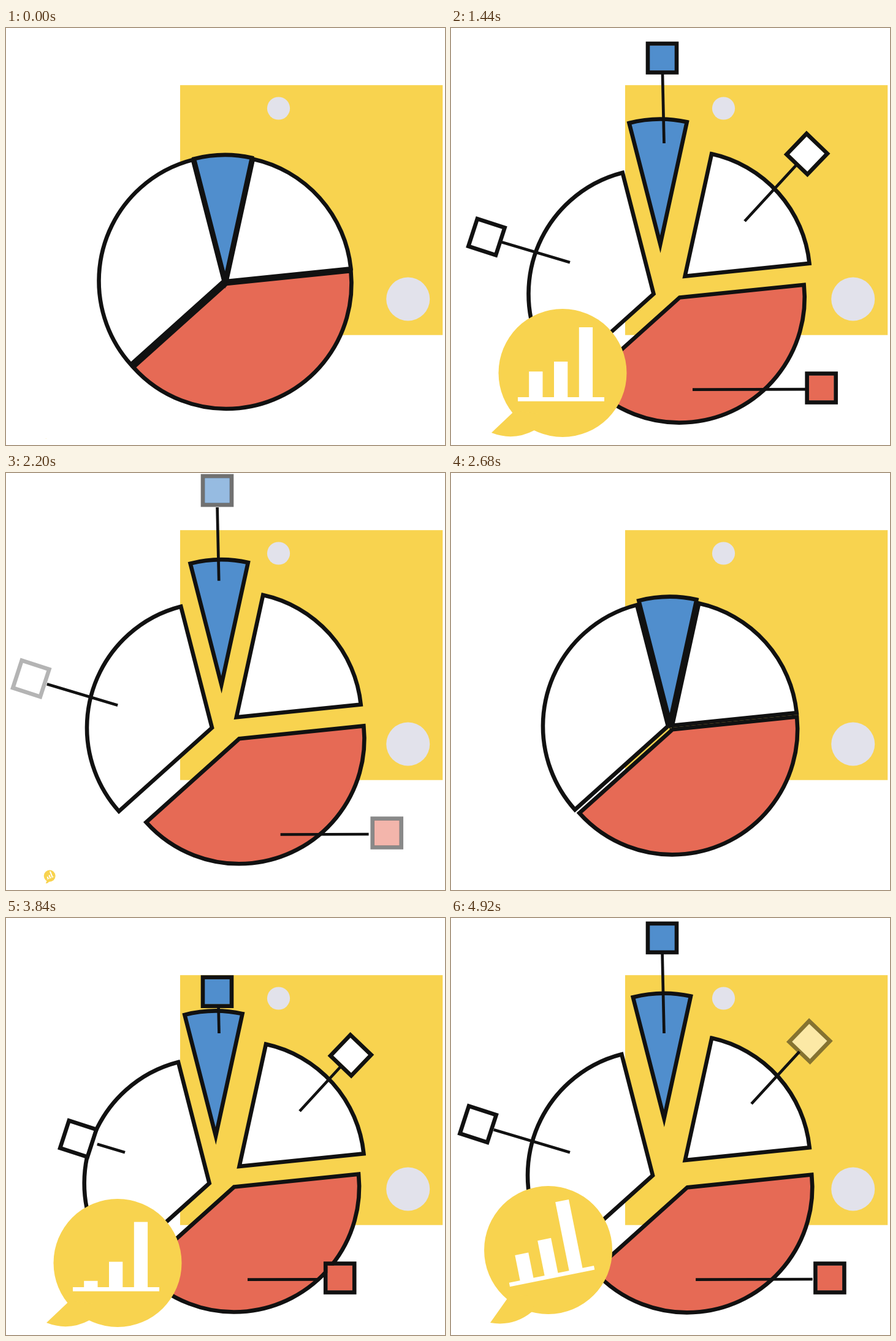
An HTML page with a canvas for the animation above (4.96 s loop, 716x680 px).

```html
<!DOCTYPE html>
<html lang="en">
<head>
<meta charset="utf-8">
<title>Pie chart</title>
<style>
  html, body { margin: 0; width: 100%; height: 100%; overflow: hidden; background: #fff; }
  canvas { display: block; }
</style>
</head>
<body>
<canvas id="stage" width="716" height="680"></canvas>
<script>
const ctx = document.getElementById('stage').getContext('2d');
const LOOP = 4960, CYCLE = 3000, RAD = Math.PI / 180;
const YELLOW = '#f8d34f', BLUE = '#508ecd', RED = '#e66a55', GREY = '#e2e2eb', INK = '#111', WHITE = '#fff';
const RADIUS = 204, OUTLINE = 6.6;

const mix = (a, b, u) => a.map((v, i) => v + (b[i] - v) * u);
const ramp = (t, start, length) => Math.min(1, Math.max(0, (t - start) / length));
const smooth = (t, start, length) => {
  const u = ramp(t, start, length);
  return u * u * (3 - 2 * u);
};
const easeOut = u => 1 - (1 - u) ** 3;
// Slows down exponentially towards 1
const settle = (t, start, pace) => t > start ? 1 - Math.exp((start - t) / pace) : 0;
// Quick S-curve with a long tail, halfway after `half` ms
const swing = (t, start, half, power) => t > start ? 1 / (1 + (half / (t - start)) ** power) : 0;

// Each slice moves from rest by `open`, drifts on to `far`, then returns
const slices = [
  { color: WHITE, from: 138.1, to: 255.6, rest: [355.5, 412.5], open: [-25.5, 21.5], far: [-27, 4] },
  { color: WHITE, from: -77.7, to: -5.85, rest: [359.5, 413], open: [22.5, -8.5], far: [22.5, -20.3] },
  { color: RED, from: -5.85, to: 138.1, rest: [359.5, 417], open: [13.5, 23], far: [29, 22.5] },
  { color: BLUE, from: -104.4, to: -77.7, rest: [357.5, 411], open: [-16.5, -59.5], far: [-8.5, -91] }
];

// A square travels from a to b while a line grows from tail to head
const labels = [
  { color: BLUE, angle: 0, start: 400, a: [344.5, 283], b: [344.5, 24], hide: 2120,
    tail: [347.5, 188], head: [344.5, 53], lineStart: 670, pace: 400, trim: [2020, 600] },
  { color: WHITE, angle: 18, start: 400, a: [254.7, 404.2], b: [37, 334], hide: 2064,
    tail: [194, 382.3], head: [64, 343.5], lineStart: 670, pace: 400, trim: [2020, 600] },
  { color: RED, angle: 0, start: 400, a: [408.7, 587], b: [625, 587], hide: 2100,
    tail: [394, 589.7], head: [593, 589], lineStart: 550, pace: 335, trim: [1796, 780] },
  { color: WHITE, angle: 43.8, start: 60, a: [444.7, 342.8], b: [587, 199], hide: 1820,
    tail: [479, 315], head: [570, 216], lineStart: 250, pace: 420, trim: [1772, 428] }
];

function disc(x, y, r, color) {
  ctx.fillStyle = color;
  ctx.beginPath();
  ctx.arc(x, y, r, 0, 7);
  ctx.fill();
}

function drawSlice(s, t) {
  const out = swing(t, 0, 283, 2.43) * (1 - swing(t, 2010, 265, 3));
  const [dx, dy] = mix(s.open, s.far, smooth(t, 1460, 640));
  const x = s.rest[0] + dx * out, y = s.rest[1] + dy * out;
  ctx.beginPath();
  ctx.moveTo(x, y);
  ctx.arc(x, y, RADIUS, s.from * RAD, s.to * RAD);
  ctx.closePath();
  ctx.fillStyle = s.color;
  ctx.fill();
  ctx.lineWidth = OUTLINE;
  ctx.stroke();
}

function drawLabel(l, t) {
  ctx.save();
  ctx.globalAlpha = ramp(t, l.start, 100) * (1 - ramp(t, l.hide, 200));
  ctx.translate(...mix(l.a, l.b, settle(t, l.start, 445)));
  ctx.rotate(l.angle * RAD);
  ctx.fillStyle = l.color;
  ctx.fillRect(-20.5, -20.5, 41, 41);
  ctx.lineWidth = OUTLINE;
  ctx.strokeRect(-23.5, -23.5, 47, 47);
  ctx.restore();

  const from = ramp(t, ...l.trim) ** 2, to = settle(t, l.lineStart, l.pace);
  if (from >= to) return;
  ctx.lineWidth = 4.7;
  ctx.beginPath();
  ctx.moveTo(...mix(l.tail, l.head, from));
  ctx.lineTo(...mix(l.tail, l.head, to));
  ctx.stroke();
}

function drawBubble(t) {
  const scale = Math.sin(ramp(t, 0, 470) * Math.PI / 2) * (1 - smooth(t, 1920, 345));
  if (scale <= 0) return;
  const turn = -30.7 * (1 - smooth(t, 0, 640)) - 22.6 * smooth(t, 1560, 720);
  ctx.save();
  ctx.translate(65, 670);
  ctx.rotate(turn * RAD);
  ctx.scale(scale, scale);
  ctx.translate(-65, -670);
  disc(182, 562.5, 104.5, YELLOW);
  ctx.beginPath();
  ctx.moveTo(104, 624);
  ctx.lineTo(66, 660);
  ctx.quadraticCurveTo(102, 674, 136, 656);
  ctx.lineTo(150, 630);
  ctx.fill();
  ctx.fillStyle = WHITE;
  ctx.fillRect(109, 602, 141, 6.7);
  [42, 58, 114].forEach((height, i) => {
    const h = height * easeOut(ramp(t, 770 - i * 202, 800));
    if (h > 0) ctx.fillRect(127.2 + i * 40.8, 602 - h, 22.3, h + 1);
  });
  ctx.restore();
}

function draw(now) {
  const t = now % LOOP % CYCLE;
  ctx.fillStyle = WHITE;
  ctx.fillRect(0, 0, 716, 680);
  ctx.fillStyle = YELLOW;
  ctx.fillRect(284, 93.2, 428.2, 407.5);
  disc(444.5, 131, 18.6, GREY);
  disc(655.7, 442, 35.5, GREY);
  ctx.strokeStyle = INK;
  slices.forEach(s => drawSlice(s, t));
  labels.forEach(l => drawLabel(l, t));
  drawBubble(t);
  requestAnimationFrame(draw);
}
requestAnimationFrame(draw);
</script>
</body>
</html>
```
